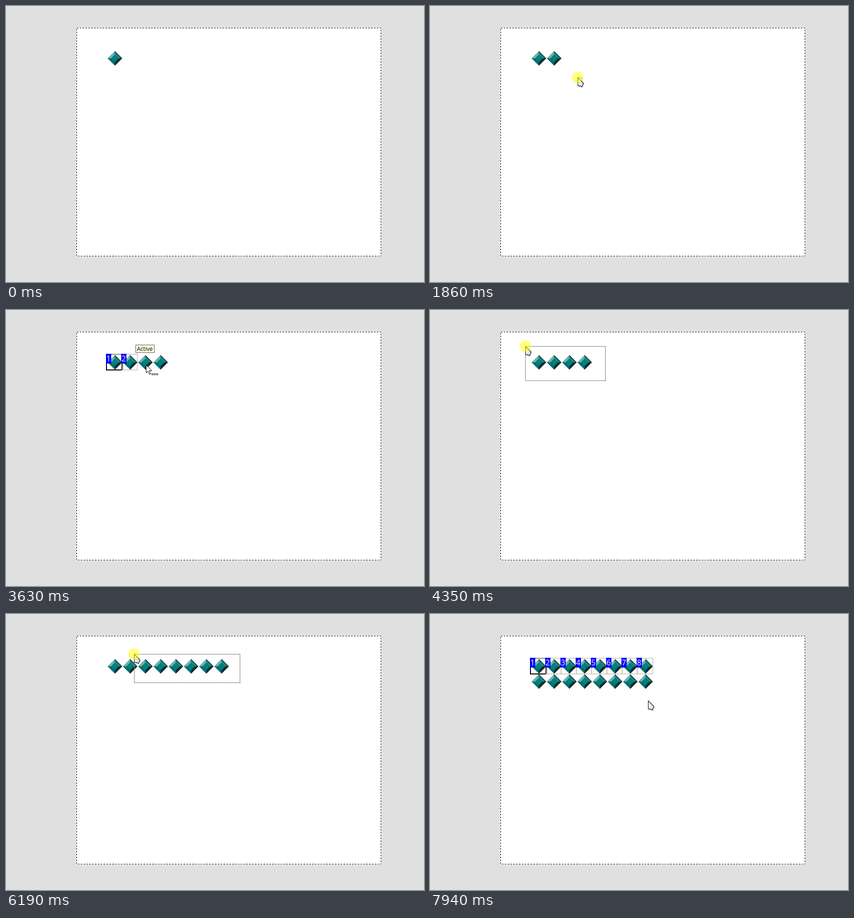
An HTML page that plays this animation: 878 by 580 pixels, repeating every 8 s.

```html
<!DOCTYPE html>
<html lang="en">
<head>
<meta charset="utf-8">
<title>Copying lamps by drag and drop</title>
<style>
  html, body { margin: 0; width: 100%; height: 100%; overflow: hidden; background: #e0e0e0; }
  svg { display: block; width: 878px; height: 580px; }
  text { font-family: "Open Sans", "Noto Sans", sans-serif; }
  .crisp { shape-rendering: crispEdges; fill: none; }
  .invert { stroke: #fff; stroke-dasharray: 1 1; mix-blend-mode: difference; }
</style>
</head>
<body>
<svg viewBox="0 0 878 580">
  <defs>
    <linearGradient id="paper" x2="1" y2="1">
      <stop offset="0" stop-color="#fff"/><stop offset="1" stop-color="#d4d4d4"/>
    </linearGradient>
    <g id="lamp">
      <path d="M0-15L15 0 0 15-15 0Z" fill="#008080"/>
      <path d="M-15 0L0-15V-8L-8 0Z" fill="#76aeae"/>
      <path d="M0-15L15 0H8L0-8Z" fill="#168888"/>
      <path d="M-15 0H-8L0 8V15Z" fill="#006e6e"/>
      <path d="M15 0L0 15V8L8 0Z" fill="#0a3030"/>
      <path d="M0-14.5L14.5 0 0 14.5" fill="none" stroke="#262222" stroke-width="1.4"/>
    </g>
    <path id="arrow" d="M.5.5V17.2L4.4 13.5 7.3 20.3 9.8 19.2 7 12.6H12.2Z" fill="#fff" stroke="#000"/>
    <g id="point">
      <path d="M2 3L14 14 10.5 22 2 19.5Z" fill="#000" opacity=".14"/>
      <path d="M.5.5L12.5 12.5 9 20 6.5 18.4.5 17.6Z" fill="url(#paper)" stroke="#111" stroke-width="1.1" stroke-linejoin="round"/>
    </g>
    <g id="hover">
      <use href="#arrow"/>
      <g fill="#fff" stroke="#000">
        <circle cx="13.5" cy="20" r="1.7"/><circle cx="18.5" cy="20" r="1.7"/><circle cx="23.5" cy="20" r="1.7"/>
      </g>
    </g>
    <g id="copy">
      <use href="#arrow"/>
      <rect x="2.5" y="14.5" width="8" height="7" class="crisp" stroke="#000" stroke-dasharray="1 1"/>
      <rect x="10.5" y="18.5" width="10" height="10" fill="#fff" stroke="#000"/>
      <path d="M13 23.5H18M15.5 21V26" stroke="#000"/>
    </g>
  </defs>
  <rect width="878" height="580" fill="#e0e0e0"/>
  <rect x="148" y="46" width="640" height="480" fill="#fff"/>
  <rect x="148.5" y="46.5" width="639" height="479" class="crisp" stroke="#000" stroke-dasharray="3 3"/>
  <g id="scene"></g>
</svg>
<script>
const LOOP = 8000, STEP = 32, X0 = 228.6, Y0 = 110;
const scene = document.getElementById('scene');

const bursts = [
  [0, 0, 1], [100, 820, 9], [920, 1660, 9], [1760, 2560, 9], [2660, 3390, 9], [3490, 4250, 11],
  [4350, 5150, 9], [5250, 5990, 9], [6090, 6890, 9], [6990, 7740, 9], [7840, 7940, 2]
];

// Pointer path: time, x, y
const path = [
  [100, 655, 518], [280, 520, 385], [460, 345, 225], [640, 235, 122], [730, 206, 96], [820, 208, 97],
  [1010, 231, 107], [1110, 231, 107], [1290, 263, 108], [1380, 264, 108], [1660, 311, 154],
  [1760, 319, 158], [1860, 310, 150], [2160, 179, 63], [2260, 179, 63], [2560, 200, 90],
  [2660, 204, 94], [2840, 229, 112], [2930, 229, 112], [3210, 293, 115], [3390, 294, 115],
  [3640, 294, 115], [3790, 368, 148], [3870, 368, 148], [4250, 208, 82], [4350, 200, 76],
  [4450, 200, 76], [4750, 235, 112], [4950, 235, 112], [5150, 283, 112], [5440, 363, 114],
  [5530, 363, 114], [5900, 480, 140], [5990, 491, 144], [6090, 491, 144], [6190, 269, 84],
  [6290, 190, 69], [6390, 179, 66], [6490, 181, 68], [6790, 233, 108], [6990, 233, 108],
  [7270, 233, 140], [7380, 234, 141], [7740, 271, 153], [7840, 372, 170], [7940, 458, 182]
];

// Copy drags: press, drop, lamps copied, grab point, lamps afterwards
const drags = [
  [1010, 1380, 1, 231, 107, 2], [2900, 3300, 2, 229, 112, 4],
  [4880, 5530, 4, 235, 112, 8], [6980, 7380, 8, 233, 108, 16]
];
// Selection boxes: press, release, corner, lamps caught
const lassos = [
  [1760, 2260, 319, 158, 2], [3790, 4440, 368, 148, 4], [6080, 6480, 491, 144, 8]
];
// Tooltips: from, to, x, y
const tips = [[3380, 3640, 272, 73], [4740, 5240, 208, 127], [6880, 7260, 208, 127]];

const active = (list, t) => list.find(e => t >= e[0] && t < e[1]);

function snap(t) {
  const [a, b, n] = bursts.filter(e => e[0] <= t).pop();
  if (n < 2) return a;
  const gap = (b - a) / (n - 1);
  return a + gap * Math.min(n - 1, Math.floor((t - a) / gap + 1e-6));
}

function pointer(t) {
  const i = path.findIndex(p => p[0] > t);
  if (i < 1) return path[i < 0 ? path.length - 1 : 0].slice(1);
  const [a, x, y] = path[i - 1], [b, u, v] = path[i], k = (t - a) / (b - a);
  return [Math.round(x + (u - x) * k), Math.round(y + (v - y) * k)];
}

const place = i => i < 8 ? [X0 + i * STEP, Y0] : [X0 + (i - 8) * STEP, Y0 + STEP];
const use = (id, x, y) => `<use href="#${id}" x="${x}" y="${y}"/>`;
const box = (x, y, w, h) => `<rect x="${x + .5}" y="${y + .5}" width="${w}" height="${h}" class="crisp invert"/>`;
const line = (d, color, dash) =>
  `<path d="${d}" class="crisp" stroke="${color}" stroke-width="2"${dash ? ' stroke-dasharray="1 1"' : ''}/>`;

function marks(n) {
  let s = '';
  for (let i = 1; i < n; i++) {
    const x = 211 + i * STEP;
    s += line(`M${x} 93H${x + 33}V126H${x}Z`, '#a4a4a4', true);
  }
  if (n) s += line('M211 93V126H243', '#000') + line('M211 93H243V126', '#222', true);
  if (n > 1) s += line('M245 112V126', '#000', true);
  for (let i = 0; n > 1 && i < n; i++) {
    const x = 210 + i * STEP;
    s += `<rect x="${x}" y="92" width="11" height="20.5" fill="#00f"/>` +
      `<text x="${x + 5.3}" y="108" font-size="16" text-anchor="middle" fill="#fff">${i + 1}</text>`;
  }
  return s;
}

function selected(t) {
  if (active(lassos, t)) return 0;
  const last = lassos.filter(e => e[1] <= t).pop();
  return last ? last[4] : t >= 1100 ? 1 : 0;
}

function draw(time) {
  const t = snap(time), [x, y] = pointer(t);
  const drag = active(drags, t), lasso = active(lassos, t), tip = active(tips, t);
  const done = drags.filter(d => d[1] <= t).pop();
  const lamps = Array.from({ length: done ? done[5] : 1 }, (_, i) => place(i));
  let s = lamps.map(p => use('lamp', ...p)).join('') + marks(selected(t));

  if (tip) {
    s += `<rect x="${tip[2] + .5}" y="${tip[3] + .5}" width="39" height="16" fill="#ffffe1" stroke="#555"/>` +
      `<text x="${tip[2] + 3}" y="${tip[3] + 13}" font-size="12" fill="#000">Active</text>`;
  }

  const moved = drag && (x !== drag[3] || y !== drag[4]);
  if (moved) {
    for (let i = 0; i < drag[2]; i++) s += box(212 + i * STEP + x - drag[3], 94 + y - drag[4], 31, 31);
  }
  if (lasso) {
    const [, , u, v] = lasso;
    s += box(Math.min(x, u), Math.min(y, v), Math.abs(x - u), Math.abs(y - v));
  }
  if (t >= 100) {
    const over = !lasso && lamps.some(p => Math.abs(p[0] - x) + Math.abs(p[1] - y) < 16);
    s += use(moved ? 'copy' : over ? 'hover' : 'point', x, y);
  }
  if (drag || lasso) s += `<circle cx="${x}" cy="${y}" r="12" fill="#ff0" opacity=".5"/>`;
  scene.innerHTML = s;
}

const start = performance.now();
function tick() {
  draw((performance.now() - start) % LOOP);
  requestAnimationFrame(tick);
}
tick();
</script>
</body>
</html>
```
